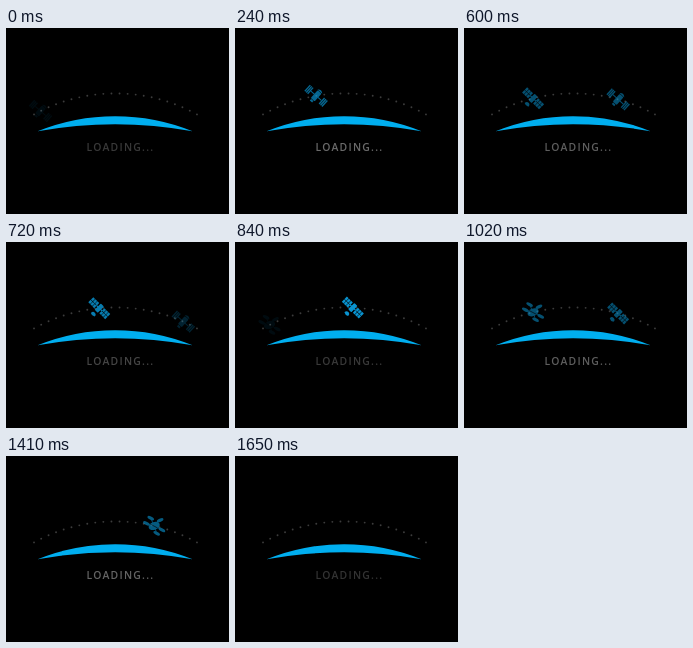
Recreate the animation shown at these times as an HTML page. Size 223x186 px, loop 1680 ms.

```html
<!DOCTYPE html>
<html lang="en">
<head>
<meta charset="utf-8">
<title>Loading</title>
<style>
  html, body { margin: 0; width: 100%; height: 100%; overflow: hidden; background: #000; }
  svg { display: block; width: 100%; height: 100%; }
  text { font: 600 10.4px "Open Sans", sans-serif; letter-spacing: 1.25px; }
</style>
</head>
<body>
<svg viewBox="0 0 223 186">
  <g id="dots" fill="#3c3c3c"></g>
  <path d="M31.6 103.2A207 207 0 0 1 186.6 103.2A432 432 0 0 0 31.6 103.2Z" fill="#00aeef"/>
  <text id="label" x="80.6" y="123.2">LOADING...</text>
  <g id="fleet" fill="#0a9fe0"></g>
</svg>
<script>
const NS = "http://www.w3.org/2000/svg";
const LOOP = 1680, FLIGHT = 840, STEP = 30;
const orbit = { x: 109.5, y: 234, r: 168.6 };
const $ = id => document.getElementById(id);

function add(parent, tag, attrs) {
  const el = document.createElementNS(NS, tag);
  for (const key in attrs) el.setAttribute(key, attrs[key]);
  return parent.appendChild(el);
}

function onOrbit(degrees) {
  const a = degrees * Math.PI / 180;
  return [orbit.x + orbit.r * Math.sin(a), orbit.y - orbit.r * Math.cos(a)];
}

for (let i = 0; i < 22; i++) {
  const [cx, cy] = onOrbit(-28.9 + i * 2.752);
  add($("dots"), "circle", { cx, cy, r: 0.95 });
}

// Solar panel made of small cells, centred on (cx, 0)
function panel(parent, cx, width, height, cols, rows) {
  const gap = 0.45, w = width / cols, h = height / rows;
  for (let c = 0; c < cols; c++)
    for (let r = 0; r < rows; r++)
      add(parent, "rect", {
        x: cx - width / 2 + c * w + gap / 2, y: -height / 2 + r * h + gap / 2,
        width: w - gap, height: h - gap
      });
}

function relay(g) {
  for (const side of [-1, 1]) panel(g, side * 9.6, 5.6, 8.6, 3, 1);
  add(g, "rect", { x: -7, y: -0.5, width: 14, height: 1 });
  add(g, "rect", { x: -2.6, y: -5.2, width: 5.2, height: 10.4, rx: 1 });
  add(g, "path", { d: "M-3.2-5.6Q0-9 3.2-5.6ZM-1.6 5.7h3.2v2h-3.2z" });
}

function dish(g) {
  for (const side of [-1, 1]) panel(g, side * 7.8, 8.8, 7.6, 3, 2);
  add(g, "rect", { x: -4, y: -0.6, width: 8, height: 1.2 });
  add(g, "rect", { x: -2.2, y: -4.4, width: 4.4, height: 8.8, rx: 0.8 });
  add(g, "path", { d: "M-2.6 9.3Q-2.6 6.3 0 6.3T2.6 9.3Q0 11-2.6 9.3Z" });
}

function probe(g) {
  add(g, "ellipse", { rx: 5.8, ry: 3.8, transform: "rotate(-25)" });
  const paddles = [[-8, -2, 24], [-4, -7.5, 24], [5.5, -6, -30], [8, 3.5, 24], [3, 7.2, 24]];
  for (const [x, y, turn] of paddles) {
    add(g, "line", { x2: x, y2: y, stroke: "#0a9fe0", "stroke-width": 0.8 });
    add(g, "ellipse", { rx: 3.6, ry: 1.6, transform: `translate(${x} ${y}) rotate(${turn})` });
  }
  add(g, "path", { d: "M-4-1.5L3.5 1.8", stroke: "#000", "stroke-width": 0.6 });
}

const fleet = [
  { draw: relay, start: 0, tilt: 42 },
  { draw: dish, start: 420, tilt: 45 },
  { draw: probe, start: 840, tilt: 4 }
].map(craft => {
  const node = add($("fleet"), "g", {});
  craft.draw(add(node, "g", { transform: `rotate(${craft.tilt})` }));
  return { ...craft, node };
});

// Linear rise and fall, brightest at 390 ms and dark at 810 ms
const glow = t => Math.max(0, 1 - Math.abs(t - 390) / 420);

function render(now) {
  const time = Math.floor((now % LOOP) / STEP) * STEP;
  const grey = Math.round(51 + 85 * glow(time % FLIGHT));
  $("label").setAttribute("fill", `rgb(${grey},${grey},${grey})`);

  for (const { node, start } of fleet) {
    const t = time - start;
    node.setAttribute("opacity", t < 0 ? 0 : glow(t));
    node.setAttribute("transform", `translate(${onOrbit(-26.4 + 0.0696 * t)})`);
  }
}

const begin = performance.now();
function tick() {
  render(performance.now() - begin);
  requestAnimationFrame(tick);
}
tick();
</script>
</body>
</html>
```
